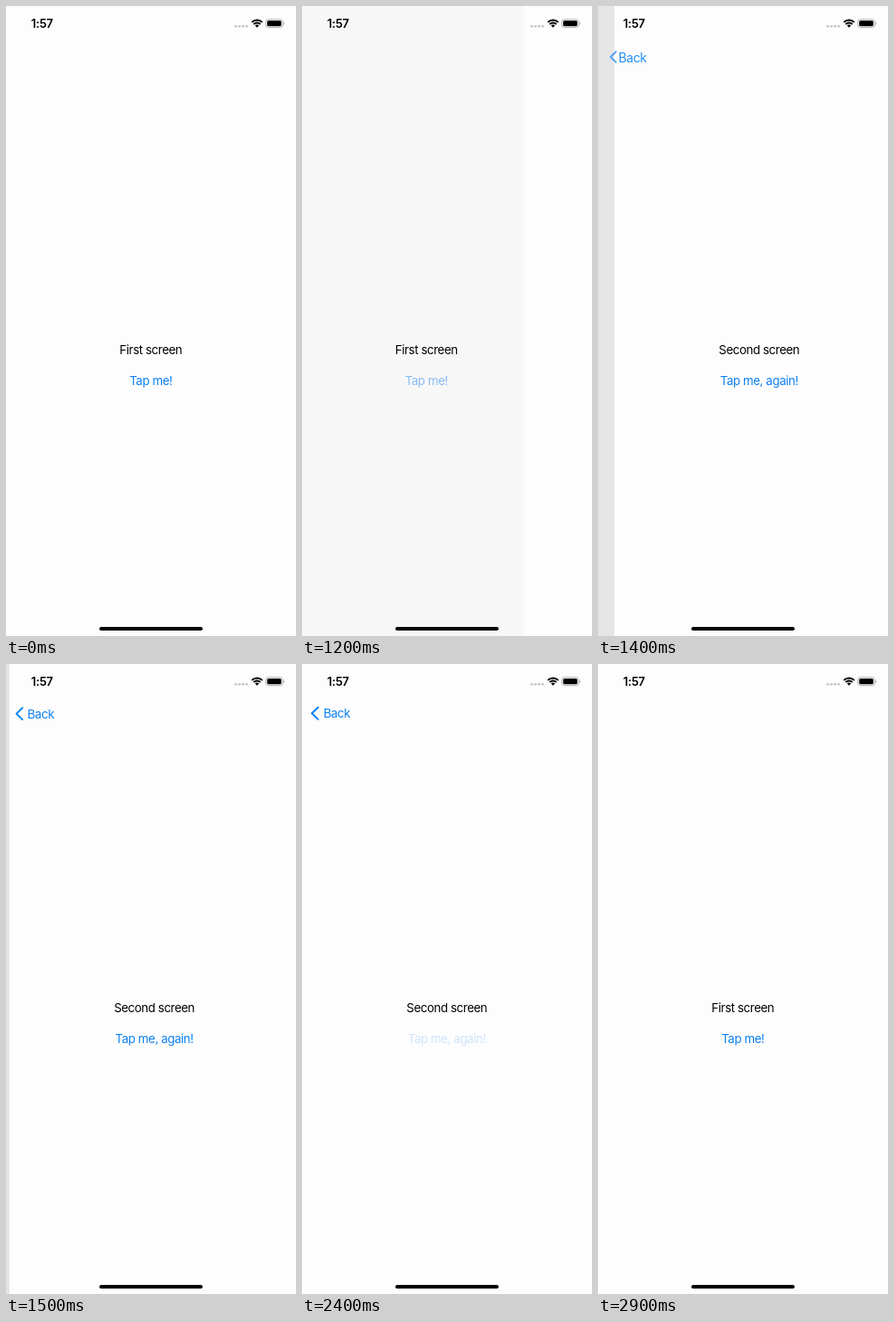
Write an HTML page that moves like this. It is 320x693 px and loops after 3 s.

```html
<!DOCTYPE html>
<html lang="en">
<head>
<meta charset="utf-8">
<title>Two screens</title>
<style>
  html, body { margin: 0; width: 100%; height: 100%; overflow: hidden; background: #fefdfe; }
  svg { display: block; width: 100%; height: 100%; }
  text { font: 400 13.3px Inter, "Liberation Sans", sans-serif; letter-spacing: -0.42px; }
  .mid { text-anchor: middle; }
  .link { fill: #0a80f0; }
  .paper { fill: #fefdfe; }
  .clock { font-weight: 600; font-size: 13px; letter-spacing: -0.3px; }
</style>
</head>
<body>
<svg viewBox="0 0 320 693">
  <rect class="paper" width="320" height="693"/>
  <g id="first">
    <text class="mid" x="159.8" y="382.7">First screen</text>
    <text class="mid link" id="tap1" x="159.8" y="416.8">Tap me!</text>
  </g>
  <rect id="dim" width="320" height="693" opacity="0"/>
  <g id="second">
    <rect class="paper" width="321" height="693"/>
    <text class="mid" x="159.8" y="382.7">Second screen</text>
    <text class="mid link" id="tap2" x="159.8" y="416.8">Tap me, again!</text>
  </g>

  <path id="chevron" d="M3.4 -6.6L-3.4 0L3.4 6.6" fill="none" stroke="#0a80f0" stroke-width="2" stroke-linecap="round" stroke-linejoin="round"/>
  <text id="back" class="link">Back</text>

  <text class="mid clock" x="39.8" y="24">1:57</text>
  <g fill="#c4c4c6">
    <circle cx="253.6" cy="22.3" r="1.4"/>
    <circle cx="257.7" cy="22.3" r="1.4"/>
    <circle cx="261.7" cy="22.3" r="1.4"/>
    <circle cx="265.7" cy="22.3" r="1.4"/>
  </g>
  <g id="wifi" transform="translate(277 23.7)" fill="none" stroke="#000" stroke-width="1.9"></g>
  <rect x="286.7" y="14.7" width="18.6" height="9" rx="2.7" fill="none" stroke="#a5a5a7" stroke-width="0.9"/>
  <rect x="288.2" y="16.1" width="15.6" height="6.2" rx="1.5"/>
  <path d="M306.3 17.6a1.8 1.8 0 0 1 0 3.2z" fill="#a5a5a7"/>
  <rect x="103" y="682.9" width="114" height="4.2" rx="2.1"/>
</svg>
<script>
const LOOP = 3000, STEP = 100, WIDTH = 320;
const PUSH = 1150, POP = 2400, RATE = 0.0184;
const $ = id => document.getElementById(id);
const clamp = v => Math.max(0, Math.min(1, v));
const set = (id, name, value) => $(id).setAttribute(name, value);

// Wi-Fi fan: two arcs and a wedge sharing one centre
const arc = r => {
  const k = r * Math.SQRT1_2;
  return `M${-k} ${-k}A${r} ${r} 0 0 1 ${k} ${-k}`;
};
$("wifi").innerHTML =
  `<path d="${arc(8.2)}"/><path d="${arc(5.2)}"/>` +
  `<path d="${arc(3.1)}L0 0z" fill="#000" stroke="none"/>`;

// Critically damped spring, falling from 1 to 0
const spring = ms => {
  const a = Math.max(0, ms) * RATE;
  return (1 + a) * Math.exp(-a);
};

// Share of the width by which the second screen is off to the right
function gap(t) {
  if (t < PUSH || t >= 2900) return 1;
  if (t >= POP) return 1 - spring(t - POP);
  return t >= 1700 ? 0 : spring(t - PUSH);
}

// Pressed links drop to 20% and recover after release
function press(t, start) {
  const d = t - start;
  return d < 0 || d >= 400 ? 1 : Math.min(1, 0.2 + d * 0.00275);
}

function draw(t) {
  const g = gap(t);
  set("second", "transform", `translate(${g * WIDTH} 0)`);
  set("first", "transform", `translate(${-0.3 * (1 - g) * WIDTH} 0)`);
  set("dim", "opacity", 0.1 * (1 - g));
  set("tap1", "opacity", press(t, 1100));
  set("tap2", "opacity", press(t, 2400));

  set("back", "transform", `translate(${23.7 - 23 * g} ${59 + 45 * g}) scale(${1 + 1.12 * g})`);
  set("back", "opacity", clamp(1 - 2.1 * g));
  set("chevron", "transform", `translate(${14.3 + 45 * g} ${54.3 + 32 * g}) scale(${Math.max(0.1, 1 - 2 * g)})`);
  set("chevron", "opacity", clamp(1 - 5 * g));
}

const begin = performance.now();
function tick() {
  const t = (performance.now() - begin) % LOOP;
  draw(Math.floor(t / STEP) * STEP);
  requestAnimationFrame(tick);
}
draw(0);
requestAnimationFrame(tick);
</script>
</body>
</html>
```
